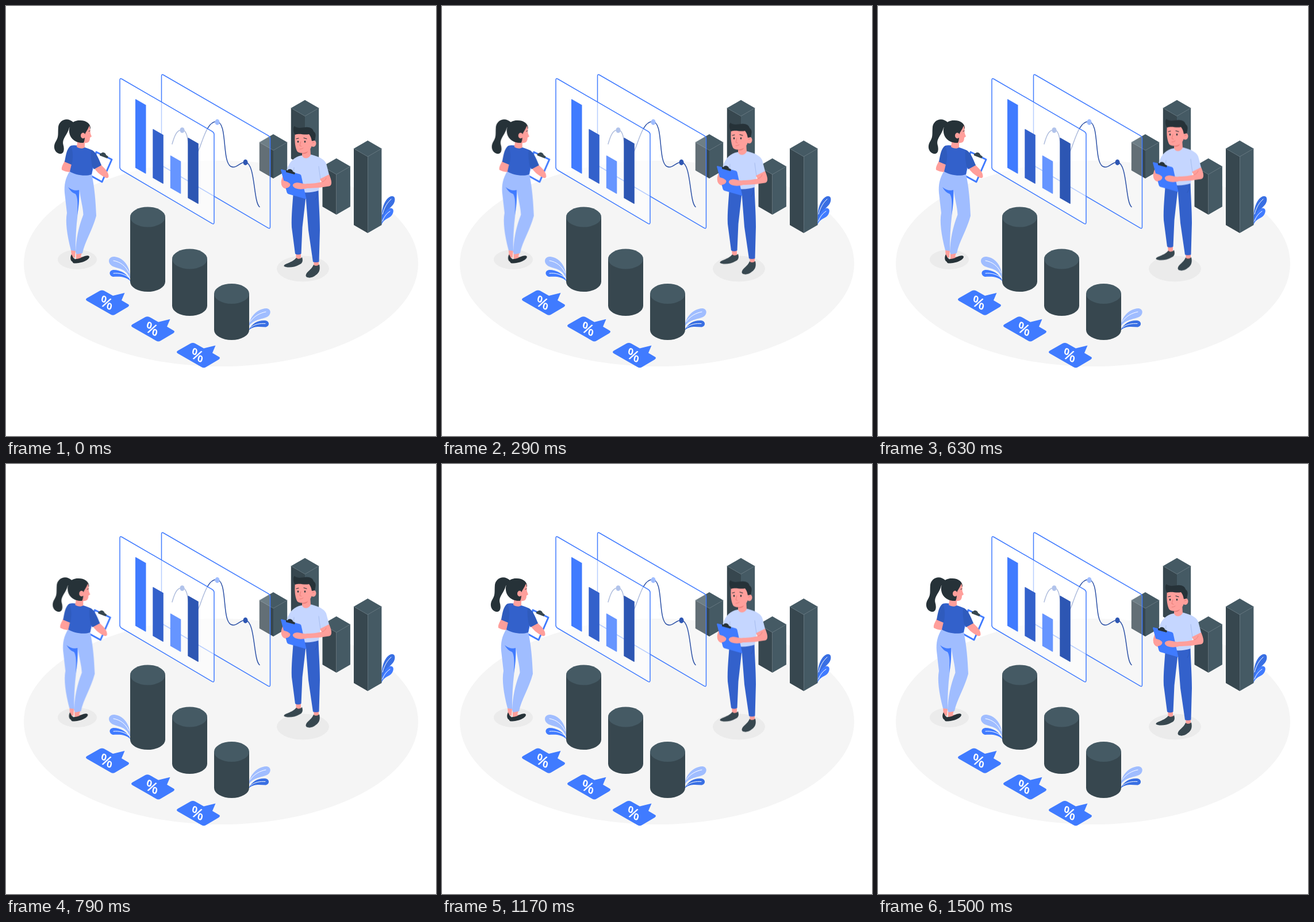
These frames come from a looping animation (748 px wide and 748 px high, 1540 ms). An HTML page:

```html
<!DOCTYPE html>
<html lang="en">
<head>
<meta charset="utf-8">
<title>Isometric charts</title>
<style>
html, body { margin: 0; width: 100%; height: 100%; overflow: hidden; background: #fff; }
svg { display: block; width: 100vw; height: 100vh; }
text { font: 600 28px "Open Sans", sans-serif; text-anchor: middle; fill: #fff; }
.vein { fill: none; stroke: #fff; stroke-width: 1; stroke-linecap: round; }
.thin { fill: none; stroke-linecap: round; stroke-linejoin: round; }
</style>
</head>
<body>
<script>
const blue = '#407bff', navy = '#3361cb', deep = '#2d56b3', pale = '#a0bdff', royal = '#396fe3';
const ink = '#263238', slate = '#37474f', steel = '#455a64';
const skin = '#ff9f9b', blush = '#e97f7a', shirt = '#c5d6ff', sleeve = '#2f5bbd';

const path = (fill, d) => `<path fill="${fill}" d="${d}"/>`;
const line = (color, width, d) => `<path class="thin" stroke="${color}" stroke-width="${width}" d="${d}"/>`;
const oval = (fill, cx, cy, rx, ry) => `<ellipse fill="${fill}" cx="${cx}" cy="${cy}" rx="${rx}" ry="${ry}"/>`;

// Square column: x and y of the top's back corner, h is the side height.
const prism = (x, y, h) => {
  const w = 24.2, k = 14;
  return path(slate, `M${x - w} ${y + k}l${w} ${k}v${h}l${-w} ${-k}z`) +
    path(steel, `M${x + w} ${y + k}l${-w} ${k}v${h}l${w} ${-k}z`) +
    path(steel, `M${x} ${y}l${w} ${k}l${-w} ${k}l${-w} ${-k}z`) +
    line('#5b6e77', .6, `M${x - w} ${y + k}l${w} ${k}l${w} ${-k}`);
};

const cylinder = (x, top, bottom) =>
  path(slate, `M${x} ${top}v${bottom - top}a30.5 17.5 0 0 0 61 0V${top}z`) +
  oval(steel, x + 30.5, top, 30.5, 17.5);

// Upright isometric sheet with slightly rounded corners.
const sheet = (x, y, w, h, veil) => {
  const s = w * .575;
  return `<path d="M${x} ${y + 2}q0 -4 3.5 -2L${x + w - 3} ${y + s - 3}q3 2 3 5V${y + s + h - 3}q0 4 -3.5 2L${x + 3} ${y + h + .5}q-3 -2 -3 -5z"
    fill="#fff" fill-opacity="${veil}" stroke="${blue}" stroke-width="1.5"/>`;
};

const bar = (fill, x, y, h) => path(fill, `M${x} ${y}q0 -1.5 1.5 -.6l17 9.8v${h}q0 1.5 -1.5 .6l-17 -9.8z`);

const bubble = i => `<g transform="translate(${i * 79} ${i * 45.7})">
  ${path(blue, 'M141 508L163 495.500Q167 493.500 171 495.500L186 504L206.500 499L201 512L212 518.500Q216 520.500 212 523.500L190 536.500Q186 539 182 536.500L141 513Q137 510.500 141 508z')}
  <text transform="matrix(.88 .4 -.25 .9 172.500 525)">%</text></g>`;

const leaf = (fill, d, vein) => path(fill, d) + `<path class="vein" d="${vein}"/>`;

const room =
  oval('#f5f5f5', 374, 448, 343, 179) +
  oval('#ebebeb', 124, 441, 34, 17) +
  oval('#ebebeb', 516.5, 457, 45.5, 22.5) +
  leaf(royal, 'M653.500 374C652 350 661 333 670 331C678 329 678 340 673 346C667 353 659 358 653.500 374z', 'M655 362C658 350 664 341 670 336') +
  leaf(blue, 'M653 381C654 364 661 353 669 351.500C677 352 674 363 668 367C661 371 656 373 653 381z', 'M655 374C658 366 662 361 668 357') +
  prism(465, 223, 49) + prism(520, 163.5, 88) + prism(574.7, 265, 70) + prism(629.2, 234, 133);

const curve = 'M289 240C293 226 297 215 306.500 215.500C315 216 316 232 318 242C322 262 329 264 335 251C343 232 350 201 366 201C386 201 375 270 391 279C401 284 407 271 416.500 271.500C434 274 430 340 441 349.500';
const charts =
  sheet(270.5, 120, 189, 158.5, .22) +
  line('#2b50a6', 1.5, curve) +
  oval(navy, 306.5, 216, 4, 4.8) + oval(pale, 367.5, 202, 4, 5) + oval(deep, 416.5, 272, 4, 5) +
  sheet(198, 127, 164, 158, .62) +
  bar(blue, 225, 163, 118.5) + bar(navy, 255.300, 215, 84) +
  bar('#6695ff', 285.800, 261, 55.5) + bar(deep, 316.300, 230, 104);

const front =
  leaf(pale, 'M216 474C217 455 205 437 188 436C177 436 176 448 186 453C197 458 208 456 216 474z', 'M187 443C199 445 208 452 214 464') +
  leaf(blue, 'M217 479C211 465 199 459 187 459C178 460 179 469 186 471C196 471 206 469 217 479z', 'M187 465C198 464 207 467 213 472') +
  leaf(pale, 'M422 558C424 539 438 527 452 526C462 526 462 537 454 541C441 546 429 546 422 558z', 'M425 549C431 540 441 534 452 532') +
  leaf(royal, 'M422 564C428 551 440 546 451 547C459 548 459 557 452 558.500C441 558 431 556 422 564z', 'M426 559C433 553 442 552 451 552.500') +
  cylinder(216, 367, 479.6) + cylinder(289, 440, 521.6) + cylinder(362, 500.5, 563.5) +
  [0, 1, 2].map(bubble).join('');

const woman =
  // clipboard
  `<path d="M157 254L184 267L167 306L147 295z" fill="#fff" stroke="${blue}" stroke-width="3" stroke-linejoin="round"/>` +
  path(slate, 'M163 257L166 256C168 253 174 256 174 259L178 262L176 265L163 260z') +
  // feet
  path(skin, 'M113 423L121 424L120 438L114 437zM122 429L132 429L130 436L137 437L122 442z') +
  path(ink, 'M114 432C111 437 112 444 116 445L120 440C117 439 116 436 114 432z') +
  path(ink, 'M116 443C120 438 124 442 132 437C138 434 144 433 145 436C145 442 131 448 118 447.500C116 447 115 445 116 443z') +
  // trousers: near leg, then far leg with the hips
  path(pale, 'M111 287C103 300 101 311 102 325L106 360C103 375 106 398 113 425L121 426C121 404 122 384 124.500 364L128 322z') +
  path(pale, 'M111 287L108 315L128 322C130 338 134 350 134.500 363C126 385 122 405 121 428L123 432L133 430C137 410 150 391 157 365C156 340 154 315 149 292z') +
  path(blue, 'M108 315C114 320 121 322 127 320C128 340 126 352 124 364C125 345 125 333 121 327C115 325 111 320 108 315z') +
  // arms and top
  path(skin, 'M102 269L115 274L113 288C108 290 101 287 97 285C96 279 100 275 102 269z') +
  path(skin, 'M153 281L164 275C172 283 179 289 178.500 297C177 301 173 299 170 297C163 293 157 288 153 281z') +
  path(navy, 'M113 243C121 240 139 246 148 250L151 279L149 293C137 297 121 294 111 288L114 275C110 262 108 250 113 243z') +
  path(sleeve, 'M113 243C106 247 104 259 102 271L114 276C117 266 117 254 113 243z') +
  path(sleeve, 'M148 250C156 252 161 265 166 277L153 284L150 279C148 269 147 259 148 250z') +
  // head
  path(skin, 'M125 232L137 232L137 246C133 249 127 248 123 245z') +
  path(skin, 'M128 212L146 207C147 213 146 218 147 222L149 227L146 229C146 236 143 239 136 238C130 236 127 224 128 212z') +
  path(ink, 'M118 203C107 192 93 198 91 210C90 222 92 227 87 235C81 244 84 255 93 257C101 258 102 249 99.500 241C97 231 107 224 110 212z') +
  path(ink, 'M129 199C117 198 109 207 110 219C111 231 122 239 135 238C137 234 137 230 137 226C137 220 142 217 145 208L147 215C148 205 140 199 129 199z') +
  oval(skin, 134, 225.5, 4, 5) +
  line(ink, 1, 'M144 218L146 217');

const man =
  // feet
  path(skin, 'M504 429H513V440L505 442zM535 443H544V452L536 454z') +
  path(slate, 'M505 438C508 441 512 440 515 437C517 443 516 448 510 450C502 455 488 456 483.500 452.500C483 448 498 447 505 438z') +
  path(slate, 'M535 450C538 453 542 452 545 449.500C547 458 545 464 539 468C533 474 522 474 521.500 469C522 462 532 459 535 450z') +
  // trousers
  path(navy, 'M500 320L543.500 318C544 345 546 365 546 390L544.500 445Q539 447 534 445L526 390L521.500 332L515.500 385L513.500 431Q508 434 503 431L497 385C496 365 499 340 500 320z') +
  line(deep, .8, 'M541 322C542 330 540 334 538 337') +
  // shirt
  path(shirt, 'M514 260L531 258.500C545 262 554 267 557 274L562.500 295L547 302L544 321C530 326 512 325 499 321L500 292L488 286C493 270 502 262 514 260z') +
  line('#9fb6ea', .8, 'M544 279C545 288 546 294 547 301M501 281L500 293') +
  // neck and head
  path(skin, 'M515 248L529 243L530 259C527 266 517 267 515 260z') +
  path(blush, 'M515 255C521 253 525 250 528 245L524 255Q520 258 515 257z') +
  path(skin, 'M503 220L534 219C535 235 533 247 526 252C519 257 509 257 506 252C502 243 502 232 503 220z') +
  oval(skin, 534.5, 239, 5, 6) +
  path(ink, 'M503 224C499 219 499 210 502 209C507 214 516 211 521 211C528 210 534 213 535 218C541 222 538 229 537 234L532 235C531 231 531 228 527 223C518 225 511 221 503 224z') +
  oval(ink, 508, 236, 1.3, 1.8) + oval(ink, 520, 236, 1.3, 1.8) +
  line(ink, 1.2, 'M505 231L509 230M518 229.500L523 231') +
  line(blush, 1, 'M513 236L511 243L514 244M511 249C514 249 516 248 517 247M533 238L536 237') +
  // clipboard and arms
  path(skin, 'M489 286L500 291C499 300 496 310 490 317C483 320 478 313 479 304C480 297 484 292 489 286z') +
  path(blue, 'M479 284L511 292.500Q513 293 513.500 295L522.500 336L491 327Q489 326 488.500 324L478 285z') +
  path(ink, 'M487 285L490 286C491 282 499 284 499 288L503 290L502 293L487 289z') +
  path(skin, 'M479 303C484 304 490 305 494 309C496 313 491 317 486 317C480 316 478 310 479 303z') +
  path(skin, 'M562 293C567 304 568 312 562 313.500C548 316 534 317 524 317C514 320 502 319 499 313C498 308 506 306 512 308C517 309 520 310 524 309C534 309 541 308 549 306L546 301z') +
  line(blush, .8, 'M550 306C554 305 556 302 557 299');

document.body.innerHTML = `<svg viewBox="0 0 748 748">${room}${charts}${front}
  <g id="woman">${woman}</g><g id="man">${man}</g></svg>`;

const loop = 1540, cycle = 1500, fps = 24, count = 37, unit = 1.496;
const shake = [0, -1, 2, -4, 4, -4, 4, -4, 2, -1, 0];

const sway = p => {
  const i = Math.min(9, Math.floor(p * 10));
  return unit * (shake[i] + (shake[i + 1] - shake[i]) * (p * 10 - i));
};
const lift = p => -10 * unit * (1 - Math.abs(2 * p - 1));

// Both motions run at 24 pictures a second, on a 10 ms clock.
const play = (id, move) => {
  const keys = Array.from({ length: count }, (_, i) => {
    const ms = i * 1000 / fps;
    return {
      offset: Math.round(ms / 10) * 10 / loop,
      transform: move(Math.min(1, ms / cycle)),
      easing: 'step-end'
    };
  });
  keys.push({ offset: 1, transform: move(0) });
  document.getElementById(id).animate(keys, { duration: loop, iterations: Infinity });
};

play('woman', p => `translate(${sway(p)}px, 0px)`);
play('man', p => `translate(0px, ${lift(p)}px)`);
</script>
</body>
</html>
```
